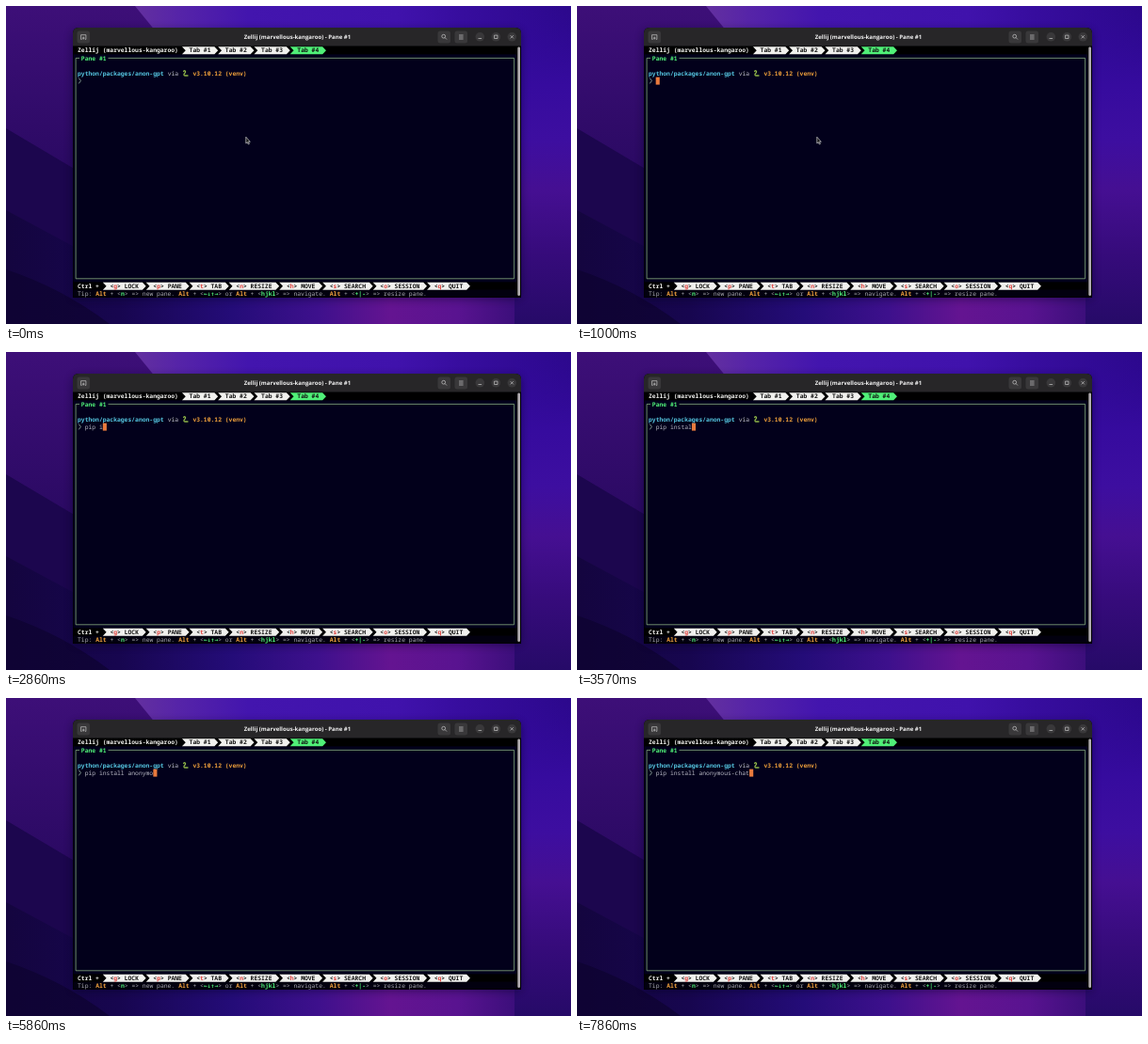
An HTML page that plays this animation: 600 by 338 pixels, repeating every 8000 ms.

```html
<!DOCTYPE html>
<html lang="en">
<head>
<meta charset="utf-8">
<title>Terminal typing</title>
<style>
html, body { margin: 0; width: 100%; height: 100%; overflow: hidden; background: #1c0b58; }
svg { display: block; width: 100vw; height: 100vh; }
text { text-rendering: geometricPrecision; white-space: pre; }
.mono { font: 6.375px "Noto Sans Mono", "DejaVu Sans Mono", monospace; }
.bold { font-weight: 700; }
.arrows { font: 700 6.375px "DejaVu Sans Mono", monospace; }
.title { font: 700 6.05px "Open Sans", "Noto Sans", sans-serif; fill: #f2f2f2; text-anchor: middle; }
.icon { fill: none; stroke: #e0e0e0; stroke-width: .6; }
</style>
</head>
<body>
<svg viewBox="0 0 600 338" preserveAspectRatio="none">
  <defs>
    <linearGradient id="left" x1="0" y1="0" x2="0" y2="1">
      <stop offset="0" stop-color="#3d0f78"/>
      <stop offset="1" stop-color="#290961"/>
    </linearGradient>
    <linearGradient id="top" x1="0" y1="0" x2="1" y2="0">
      <stop offset="0" stop-color="#63309f"/>
      <stop offset=".1" stop-color="#5624a8"/>
      <stop offset=".26" stop-color="#4315ae"/>
      <stop offset=".6" stop-color="#4012ac"/>
      <stop offset=".75" stop-color="#370d9e"/>
      <stop offset="1" stop-color="#2c088c"/>
    </linearGradient>
    <linearGradient id="right" x1="0" y1="0" x2="0" y2="1">
      <stop offset="0" stop-color="#30099a" stop-opacity="0"/>
      <stop offset=".25" stop-color="#360b9e"/>
      <stop offset=".42" stop-color="#3d0ea0"/>
      <stop offset=".58" stop-color="#450f92"/>
      <stop offset=".78" stop-color="#360b7b"/>
      <stop offset="1" stop-color="#260a68"/>
    </linearGradient>
    <linearGradient id="bottom" x1="0" y1="0" x2="1" y2="0">
      <stop offset="0" stop-color="#14053f"/>
      <stop offset=".2" stop-color="#17064f"/>
      <stop offset=".4" stop-color="#240c78"/>
      <stop offset=".55" stop-color="#3d108c"/>
      <stop offset=".68" stop-color="#641491"/>
      <stop offset=".8" stop-color="#591390"/>
      <stop offset=".91" stop-color="#390e79"/>
      <stop offset="1" stop-color="#260a68"/>
    </linearGradient>
    <filter id="soft" x="-20%" y="-20%" width="140%" height="140%"><feGaussianBlur stdDeviation="4"/></filter>
  </defs>

  <rect width="200" height="190" fill="url(#left)"/>
  <path d="M137 0H600V200H300Z" fill="url(#top)"/>
  <path d="M0 130L160 225V338H0Z" fill="#1c064e"/>
  <path d="M0 217L160 303H600V338H0Z" fill="url(#bottom)"/>
  <rect x="540" width="60" height="338" fill="url(#right)"/>
  <path d="M0 280Q60 300 110 338H0Z" fill="#0d0430" opacity=".7"/>

  <rect x="70" y="25" width="478" height="287" rx="7" fill="#05001c" opacity=".4" filter="url(#soft)"/>
  <path d="M71 310V29Q71 23 77 23H541Q547 23 547 29V310Z" fill="#000"/>
  <path d="M71 42.5V29Q71 23 77 23H541Q547 23 547 29V42.5Z" fill="#272628"/>
  <rect x="71.5" y="51.4" width="471" height="242" fill="#02001b"/>
  <rect x="71.5" y="301.5" width="471" height="8" fill="#02000f"/>
  <rect x="543.3" y="43.5" width="2.7" height="264.5" rx="1.3" fill="#b1adb0"/>

  <g fill="#39383a">
    <rect x="75.5" y="26.5" width="13.5" height="13" rx="2.5"/>
    <rect x="458.5" y="26.5" width="13.5" height="13" rx="2.5"/>
    <rect x="476.5" y="26.5" width="13.5" height="13" rx="2.5"/>
    <circle cx="503.3" cy="32.8" r="4.8"/>
    <circle cx="520.3" cy="32.8" r="4.8"/>
    <circle cx="537.3" cy="32.8" r="4.8"/>
  </g>
  <g class="icon">
    <path d="M80.6 35.4H79.6V30.7H84.9V35.4H83.9M82.2 32.6V35.6M80.8 34.1H83.7"/>
    <circle cx="464.7" cy="32.2" r="1.9"/>
    <path d="M466.1 33.6L468 35.5M481 31H485.6M481 33H485.6M481 35H485.6"/>
    <path d="M501.5 34.5H505.1M518.6 31.1H522V34.5H518.6ZM535.7 31.2L538.9 34.4M538.9 31.2L535.7 34.4"/>
  </g>
  <text class="title" x="309.5" y="35">Zellij (marvellous-kangaroo) - Pane #1</text>

  <path d="M78 55.4H74.1V289.8H539.6V55.4H108.5" fill="none" stroke="#8fb985" stroke-width=".75"/>
  <g id="screen"></g>

  <path d="M77.3 76.6L79.4 79.5L77.3 82.4" fill="none" stroke="#9bb8a8" stroke-width=".8"/>
  <path d="M188.6 69.3Q190.3 68 190.6 69.8Q190.4 71 189.3 72Q188.3 73.8 190 74H193" fill="none" stroke="#8fb548" stroke-width="1.3" stroke-linecap="round"/>
  <text id="typed" class="mono" y="81.7" fill="#b9b9c4"></text>
  <rect id="cursor" y="75.6" width="4.1" height="8" fill="#e97a3d"/>
  <path id="pointer" d="M254.8 139.2V146L256.3 144.7L257.3 147L258.4 146.5L257.4 144.3H259.3Z" fill="#1a1a1a" stroke="#eee" stroke-width=".6"/>
</svg>
<script>
const NS = "http://www.w3.org/2000/svg";
const CELL = 3.825, LEFT = 72.2, ROW = 8.075, TOP = 43.3;
const LOOP = 8000;
const $ = id => document.getElementById(id);
const screen = $("screen");
const colX = col => LEFT + col * CELL;

function add(tag, attrs, content = "") {
  const el = document.createElementNS(NS, tag);
  for (const key in attrs) el.setAttribute(key, attrs[key]);
  el.textContent = content;
  screen.append(el);
}

// Writes [text, colour, style] runs one after another; returns the next column.
function write(col, row, ...runs) {
  for (const [str, fill, style = ""] of runs) {
    add("text", { class: "mono " + style, x: colX(col), y: TOP + row * ROW + 6.15, fill }, str);
    col += str.length;
  }
  return col;
}

// Arrow-shaped label with one padding cell on both sides.
function ribbon(col, row, fill, ...runs) {
  const length = runs.reduce((n, [str]) => n + str.length, 0);
  const x = colX(col), end = colX(col + length + 4), tip = end - CELL;
  const y = TOP + row * ROW, mid = y + 4, low = y + 8;
  add("polygon", { fill, points: `${x},${y} ${tip},${y} ${end},${mid} ${tip},${low} ${x},${low} ${x + CELL},${mid}` });
  write(col + 2, row, ...runs);
  return col + length + 4;
}

const WHITE = "#f1f1ee", INK = "#111", GREEN = "#50f078", RED = "#e0403c";
const GRAY = "#a9a9ad", ORANGE = "#f0a03c", CYAN = "#55c4de";

let col = write(1, 0, ["Zellij (marvellous-kangaroo) ", WHITE, "bold"]);
for (let i = 1; i <= 4; i++) col = ribbon(col, 0, i === 4 ? GREEN : WHITE, ["Tab #" + i, INK, "bold"]);

write(2, 1, ["Pane #1", GREEN, "bold"]);
write(1, 3, ["python/packages/anon-gpt", CYAN, "bold"], [" via ", "#c2c2c8"]);
write(33, 3, ["v3.10.12 (venv)", ORANGE, "bold"]);

col = write(1, 31, ["Ctrl + ", WHITE, "bold"]);
for (const item of ["g LOCK", "p PANE", "t TAB", "n RESIZE", "h MOVE", "s SEARCH", "o SESSION", "q QUIT"])
  col = ribbon(col, 31, WHITE, ["<", INK, "bold"], [item[0], RED, "bold"], [">" + item.slice(1), INK, "bold"]);

const alt = (keys, style = "bold") =>
  [["Alt", ORANGE, "bold"], [" + ", GRAY], ["<", GRAY], [keys, GREEN, style], [">", GRAY]];
write(1, 32, ["Tip: ", GRAY], ...alt("n"), [" => new pane. ", GRAY], ...alt("←↓↑→", "arrows"), [" or ", GRAY],
  ...alt("hjkl"), [" => navigate. ", GRAY], ...alt("+|-"), [" => resize pane.", GRAY]);

const COMMAND = "pip install anonymous-chat";
// [time, letters typed], with steady typing in between
const KEYS = [[2148, 0], [3570, 10], [4570, 14], [4710, 16], [4990, 16], [6860, 24], [7290, 26], [LOOP, 26]];

function typedCount(t) {
  const i = KEYS.findIndex(([time]) => t < time);
  if (i < 1) return 0;
  const [t0, n0] = KEYS[i - 1], [t1, n1] = KEYS[i];
  return Math.floor(n0 + (n1 - n0) * (t - t0) / (t1 - t0) + 1e-6);
}

const typed = $("typed"), cursor = $("cursor"), pointer = $("pointer");
typed.setAttribute("x", colX(3));

function draw() {
  const t = performance.now() % LOOP;
  const n = typedCount(t);
  const text = COMMAND.slice(0, n);
  if (typed.textContent !== text) typed.textContent = text;
  cursor.setAttribute("x", colX(3 + n));
  // Blinks while idle, stays lit while typing
  cursor.style.display = t >= 1800 || t % 1200 >= 600 ? "" : "none";
  pointer.style.display = t < 2000 ? "" : "none";
  requestAnimationFrame(draw);
}
draw();
</script>
</body>
</html>
```
